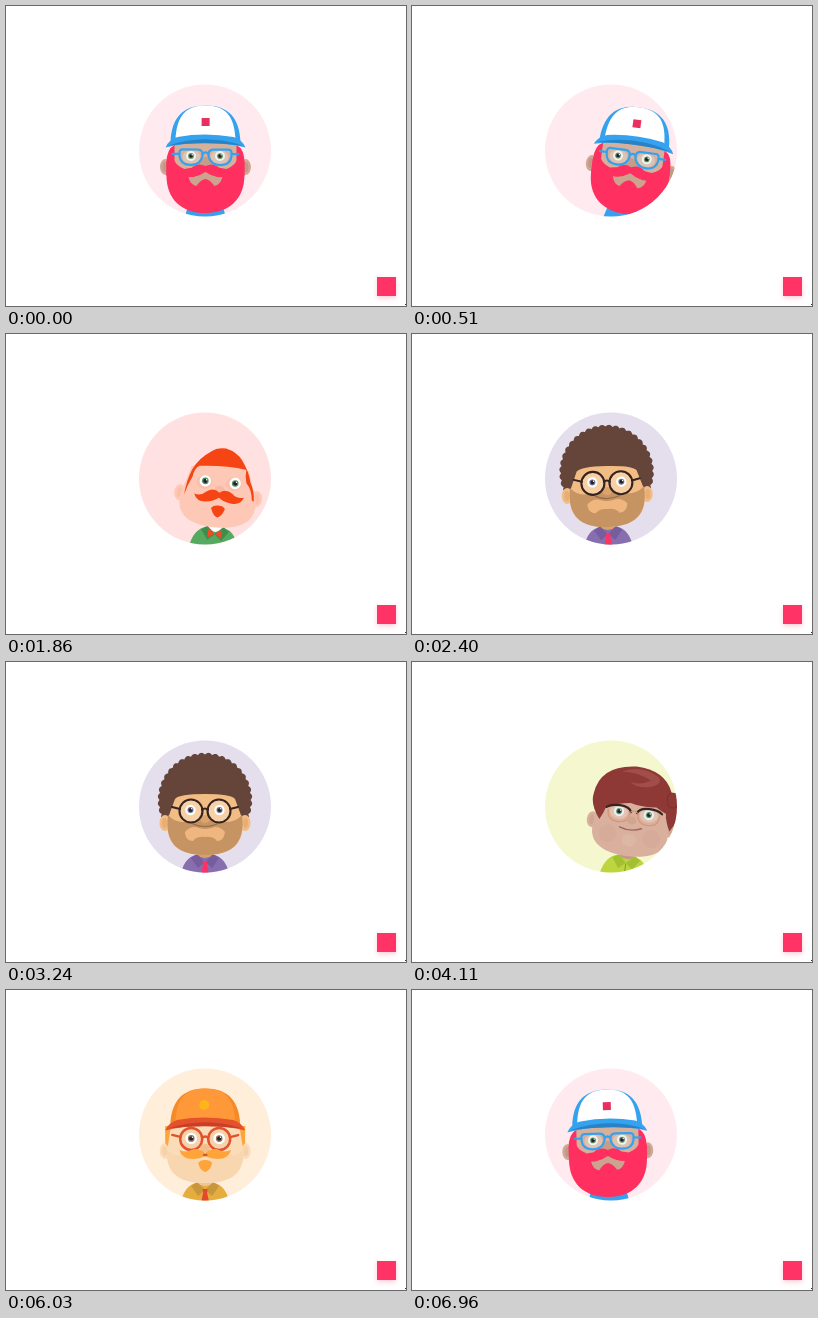
Recreate the animation shown at these times as an HTML page with a canvas. Size 400 by 300 pixels, loop 6990 ms.

```html
<!DOCTYPE html>
<html lang="en">
<head>
<meta charset="utf-8">
<title>Avatar wheel</title>
<style>
html, body { margin: 0; width: 100%; height: 100%; overflow: hidden; background: #fff; }
canvas { display: block; width: 400px; height: 300px; }
</style>
</head>
<body>
<canvas id="stage" width="400" height="300"></canvas>
<script>
const ctx = document.getElementById('stage').getContext('2d');
const LOOP = 6990, GAP = 48.5, OVER = 7.6;
const CX = 199, CY = 144.5, R = 66, PIVOT = 312;

// Drawing helpers: x is measured from the face's middle, y from the stage top.
const shape = (d, fill) => { ctx.fillStyle = fill; ctx.fill(new Path2D(d)); };
const line = (d, color, width) => {
  ctx.strokeStyle = color;
  ctx.lineWidth = width;
  ctx.stroke(new Path2D(d));
};
const oval = (x, y, rx, ry, fill) => {
  ctx.beginPath();
  ctx.ellipse(x, y, rx, ry, 0, 0, Math.PI * 2);
  ctx.fillStyle = fill;
  ctx.fill();
};
const ring = (x, y, r, color, width) => {
  ctx.beginPath();
  ctx.arc(x, y, r, 0, Math.PI * 2);
  ctx.strokeStyle = color;
  ctx.lineWidth = width;
  ctx.stroke();
};
const both = draw => {
  draw();
  ctx.save();
  ctx.scale(-1, 1);
  draw();
  ctx.restore();
};

const ears = (skin, inner, x = 40) => both(() => {
  oval(x, 161, 5.5, 8, skin);
  oval(x + 0.5, 161, 2.5, 5, inner);
});
const eyes = (gap, y, r, iris, white = '#fff') => {
  for (const x of [-gap, gap]) {
    oval(x, y, r, r, white);
    oval(x, y, r * 0.58, r * 0.58, iris);
    oval(x, y, r * 0.36, r * 0.36, '#232326');
    oval(x + 1.2, y - 1.2, 0.7, 0.7, '#fff');
  }
};
const shirt = (color, collar, skin) => {
  shape('M-7 184H7V199H-7Z', skin);
  shape('M-25 216Q-22 196 -9 193Q0 199 9 193Q22 196 25 216Z', color);
  both(() => shape('M0 200L8 192L14 196L7 206Z', collar));
};
const tie = color => shape('M-2.5 199H2.5L2 203L4 212H-4L-2 203Z', color);
const cap = (front, side, brim, under) => {
  shape('M-35 136C-34 112 -23 99.500 0 99.500C23 99.500 34 112 35 136Z', side);
  shape('M-30 134C-29 110 -20 99.500 0 99.500C20 99.500 29 110 30 134Z', front);
  shape('M-40 141.500Q-37 134 -28 131Q0 126 28 131Q37 134 40 141.500Q22 137 0 137Q-22 137 -40 141.500Z', brim);
  shape('M-37 139.500Q0 127 37 139.500Q0 135 -37 139.500Z', under);
};
const FACE = 'M-29 134Q0 122 29 134C32 148 38 156 38 169C38 187 20 193 0 193C-20 193 -38 187 -38 169C-38 156 -32 148 -29 134Z';

function capMan() {
  const pink = '#ff2f5f', blue = '#35a2ef', skin = '#d5b09c';
  shape('M-18 202H18L21 213H-21Z', blue);
  ears('#cfa995', '#c09a86');
  shape('M-39 157Q-39 143 -31 139H31Q39 143 39 157V170H-39Z', pink);
  shape('M-31 136H31V172H-31Z', skin);
  oval(0, 157, 7, 6, '#c59d89');
  shape('M-39 155L-32 152Q-31 159 -21 163Q-8 160 0 164Q8 160 21 163Q31 159 32 152L39 155V169C39 193 24 207 0 207C-24 207 -39 193 -39 169Z', pink);
  shape('M-17 171Q-8 171 0 165Q8 171 17 171Q15 179 9 180Q5 174 0 173Q-5 174 -9 180Q-15 179 -17 171Z', '#cba38e');
  shape('M0 160Q8 156 14 162Q19 167 25 166Q20 172 12 171Q6 170 0 166Q-6 170 -12 171Q-20 172 -25 166Q-19 167 -14 162Q-8 156 0 160Z', pink);
  both(() => oval(14, 151, 9, 7, '#dcc4b5'));
  eyes(14.500, 150, 5, '#5f8f68', '#f3f3ee');
  both(() => line('M3 147Q4 143.500 8 143.500H23Q27 143.500 26 150Q25 159 15 159Q5 159 3 150Z', blue, 2.2));
  line('M-3 148Q0 145 3 148M-26 148L-33 148M26 148L33 148', blue, 2.2);
  cap('#fff', blue, blue, '#2783c6');
  shape('M-4 112H4V120H-4Z', '#e92f5d');
}

function gingerMan() {
  const hair = '#f64515', skin = '#fdc9b6';
  shirt('#55aa60', '#3d8d4c', '#f7b99f');
  shape('M-7 192Q0 203 7 192Z', '#fff');
  both(() => shape('M0 199L7 195V204Z', '#f04a27'));
  ears(skin, '#fbc0ab', 38.5);
  shape(FACE, skin);
  shape('M-34 163Q-33 149 -28 137Q-22 125 -11 118Q-5 113 4 113.500Q15 116 21 124Q29 135 31 145Q36 154 36 164L34 163Q33 152 27 146Q25 139 26 133Q5 130 -21 133Q-26 136 -27 144Q-31 152 -34 163Z', hair);
  both(() => oval(14.700, 148.500, 8, 7, '#fbc0ac'));
  ctx.save();
  ctx.translate(1, 0);
  eyes(15, 147.500, 5.700, '#4d9360');
  oval(0, 155, 5, 4, '#f8b9a3');
  shape('M0 158Q6 153 13 158Q18 163 25 161Q22 169 13 168Q5 167 0 163Q-5 167 -13 168Q-22 169 -25 161Q-18 163 -13 158Q-6 153 0 158Z', hair);
  shape('M-7 174Q-5 171 0 171Q5 171 7 174Q4 182 0 183Q-4 182 -7 174Z', hair);
  ctx.restore();
}

function afroMan() {
  const hair = '#654539', dark = '#352320', skin = '#f2bd85';
  shirt('#876eae', '#765d9d', '#d8a06b');
  tie('#ff3264');
  ctx.beginPath();
  for (let i = 0; i <= 400; i++) {
    const a = Math.PI * 2 * i / 400;
    const r = 45.5 + 1.8 * Math.abs(Math.sin(a * 20));
    ctx.lineTo(r * Math.cos(a), Math.min(138 + r * Math.sin(a), 155));
  }
  ctx.fillStyle = hair;
  ctx.fill();
  ears(skin, '#e8ae76');
  shape('M-30 137Q-26 132 0 132Q26 132 30 137L37 156C41 184 24 193 0 193C-24 193 -41 184 -37 156Z', skin);
  shape('M-37 153Q-31 160 -22 160Q-10 158 0 157Q10 158 22 160Q31 160 37 153C41 184 24 193 0 193C-24 193 -41 184 -37 153Z', '#c59462');
  shape('M-20 170Q-14 163 -6 166Q0 168 6 166Q14 163 20 170Q19 179 12 179Q8 174 0 175Q-8 174 -12 179Q-19 179 -20 171Z', '#efb77f');
  line('M-12 162Q0 167 12 162', '#986c48', 1.2);
  oval(0, 157, 5, 4, '#dda36c');
  both(() => oval(14, 149, 11, 11, '#f7d0a5'));
  eyes(14.500, 148, 5.2, '#74728a');
  both(() => {
    ring(14, 149, 11.500, dark, 2.1);
    line('M25 147L33 145', dark, 2);
  });
  line('M-3 148Q0 145 3 148', dark, 2);
}

function auburnMan() {
  const hair = '#8f3936', skin = '#d9b09d';
  shirt('#bdd63f', '#a3c032', '#c89a86');
  line('M0 201V212', '#7e9c25', 1);
  ears(skin, '#d0a592', 39);
  shape(FACE, skin);
  both(() => oval(22, 173, 9, 9, '#d6ac99'));
  oval(0, 177, 7, 6, '#ddb7a6');
  ctx.save();
  ctx.translate(1.5, 0);
  both(() => {
    oval(15, 150, 9, 7, '#e2c2b2');
    line('M4 149Q4 160 15 160Q26 160 26 149', '#d99570', 1.2);
  });
  eyes(15, 149.500, 5.2, '#4e9876', '#f0eeea');
  ctx.restore();
  shape('M-32 160Q-43 147 -41 135Q-38 106 -2 103Q27 103 36 124Q47 123 47 136Q47 151 39 163Q34 154 33 146Q28 144 23 141Q9 143 -3 140Q-16 142 -27 147Q-29 154 -32 160Z', hair);
  shape('M-16 110Q3 100 22 111Q26 118 12 122Q-1 124 -6 119Q6 121 14 115Q0 108 -16 110Z', '#a14d49');
  line('M35 125Q30 130 35 138Q39 141 44 137', '#7e3030', 1.3);
  ctx.save();
  ctx.translate(1.5, 0);
  both(() => line('M3 149Q5 143.500 15 143.500Q24 143.500 28 147', '#372321', 2.2));
  ctx.restore();
  line('M-2 149Q1.500 146 5 149', '#d99570', 1.2);
  oval(0, 157, 5, 4, '#d0a592');
  line('M-11 165Q0 169 11 164', '#9d665b', 1.4);
}

function mohawkMan() {
  const hair = '#65453a', skin = '#89604f', rim = '#a28f86';
  shirt('#d5c5c5', '#c3b0b2', '#754c3d');
  tie('#553832');
  ears(skin, '#7a5344');
  shape('M-37 163Q-39 134 -24 124Q-13 117 0 117Q13 117 24 124Q39 134 37 163Q36 188 0 190Q-36 188 -37 163Z', skin);
  shape('M-9 107Q0 103 10 107L6 131Q0 129 -6 131Z', '#6b4435');
  shape('M-38 153Q-32 161 -22 161Q-8 158 0 162Q8 158 22 161Q32 161 38 153C43 186 26 201 0 201C-26 201 -43 186 -38 153Z', hair);
  shape('M-18 168Q-8 169 0 165Q8 169 18 168Q16 174 9 175Q5 171 0 172Q-5 171 -9 175Q-16 174 -18 168Z', '#8d6150');
  oval(0, 157, 6, 4, '#795141');
  both(() => line('M25 146L33 145', rim, 2));
  for (const x of [-14, 14]) {
    oval(x, 147.500, 11, 11, '#393d40');
    shape(`M${x - 10} 147Q${x} 150 ${x + 10} 144Q${x + 7} 137 ${x} 137Q${x - 9} 138 ${x - 10} 147Z`, '#54595b');
    ring(x, 147.500, 11.300, rim, 2);
  }
  line('M-3 147Q0 144 3 147', rim, 2);
}

function orangeMan() {
  const hair = '#ffa43b', red = '#e4522d', skin = '#fbdcb9';
  shirt('#e5ac3e', '#c8963d', '#f0c595');
  tie('#e5482c');
  ears(skin, '#f6d2ab');
  shape('M-40 136H40V153L36 158H-36L-40 153Z', hair);
  shape('M-34 135H34L38 160C40 186 22 193 0 193C-22 193 -40 186 -38 160Z', skin);
  shape('M-38 160Q-30 168 -23 164Q0 176 23 164Q30 168 38 160C40 186 22 193 0 193C-22 193 -40 186 -38 160Z', '#f8d7b0');
  both(() => oval(14, 149, 10, 10, '#f6d2aa'));
  eyes(14, 148.500, 5.8, '#8d7262');
  both(() => {
    ring(14, 149, 11, red, 2.5);
    line('M25 147L33 145', red, 2.3);
  });
  line('M-3 148Q0 145 3 148', red, 2.3);
  oval(0, 158, 5, 4, '#f1bf8c');
  shape('M0 163Q7 157 14 160Q19 163 26 160Q23 169 13 169Q5 169 0 166Q-5 169 -13 169Q-23 169 -26 160Q-19 163 -14 160Q-7 157 0 163Z', hair);
  oval(0, 165, 2.5, 1.2, '#c95a3a');
  shape('M-7 173Q-5 170 0 170Q5 170 7 173Q5 181 0 182Q-5 181 -7 173Z', hair);
  ctx.save();
  ctx.translate(0, -1);
  cap('#ff9838', '#f58a2a', red, '#c83f25');
  ctx.restore();
  oval(-1, 115, 5, 5, '#fdb51c');
}

// c: moment a face passes the middle; s: slowness of its swing.
const steps = [
  { c: -3, s: 1.6, bg: '#ffeaf0', draw: capMan },
  { c: 1325, s: 1, bg: '#ffe1e1', draw: gingerMan },
  { c: 2420, s: 1, bg: '#e4deed', draw: afroMan },
  { c: 3750, s: 1, bg: '#f5f8cf', draw: auburnMan },
  { c: 4680, s: 1, bg: '#f0efe4', draw: mohawkMan },
  { c: 6030, s: 1, bg: '#ffeeda', draw: orangeMan },
  { c: 6987, s: 1.6, bg: '#ffeaf0', draw: capMan }
];
const LEAD = 290, PEAK = 360, REST = 800;
const EASE = Math.log(OVER / (GAP + OVER)) / Math.log(PEAK / (PEAK + LEAD));

// Degrees turned by one step: fast swing in, overshoot, soft return.
function swing(x) {
  if (x <= -LEAD) return 0;
  if (x < PEAK) return (GAP + OVER) * (1 - Math.pow((PEAK - x) / (PEAK + LEAD), EASE));
  if (x < REST) return GAP + OVER * (1 + Math.cos(Math.PI * (x - PEAK) / (REST - PEAK))) / 2;
  return GAP;
}

function render(t) {
  ctx.globalAlpha = 1;
  ctx.fillStyle = '#fff';
  ctx.fillRect(0, 0, 400, 300);

  const wheel = steps.reduce((sum, p) => sum + swing((t - p.c) / p.s), -GAP);
  const fade = p => Math.max(0, Math.min(1, (t - p.c + LEAD * p.s) / 150));

  ctx.save();
  ctx.beginPath();
  ctx.arc(CX, CY, R, 0, Math.PI * 2);
  ctx.clip();
  steps.forEach((p, i) => {
    const next = steps[i + 1];
    if (next && fade(next) === 1) return;
    ctx.globalAlpha = fade(p);
    ctx.fillStyle = p.bg;
    ctx.fillRect(CX - R - 1, CY - R - 1, 2 * R + 2, 2 * R + 2);
  });
  ctx.globalAlpha = 1;
  ctx.lineCap = 'round';
  steps.forEach((p, i) => {
    const angle = wheel - GAP * i;
    if (Math.abs(angle) > 62) return;
    ctx.save();
    ctx.translate(CX, PIVOT);
    ctx.rotate(angle * Math.PI / 180);
    ctx.translate(0, -PIVOT);
    p.draw();
    ctx.restore();
  });
  ctx.restore();

  // Corner badge
  ctx.save();
  ctx.shadowColor = 'rgba(255, 51, 102, 0.25)';
  ctx.shadowBlur = 5;
  ctx.shadowOffsetY = 2;
  ctx.fillStyle = '#ff3366';
  ctx.fillRect(371, 271, 19, 19);
  ctx.restore();
  ctx.fillStyle = '#333';
  ctx.fillRect(399, 298, 1, 1);
}

const start = performance.now();
function tick() {
  render((performance.now() - start) % LOOP);
  requestAnimationFrame(tick);
}
tick();
</script>
</body>
</html>
```
